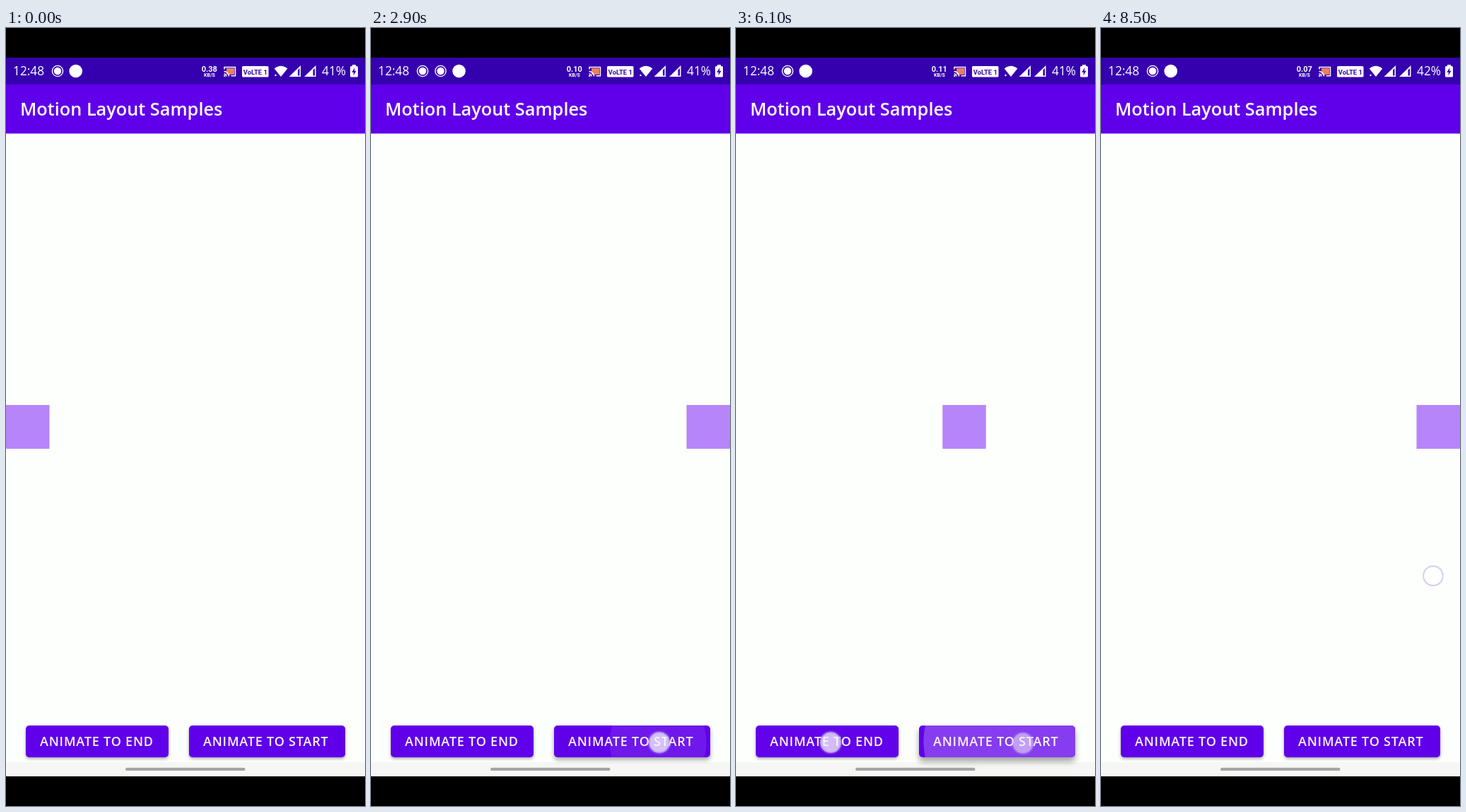
Write an HTML page with a canvas that moves like this. It is 508 px wide and 1102 px high and loops after 8.6 s.

```html
<!DOCTYPE html>
<html lang="en">
<head>
<meta charset="utf-8">
<title>Motion Layout Samples</title>
<style>
  html, body { margin: 0; width: 100%; height: 100%; overflow: hidden; background: #000; }
  canvas { display: block; }
</style>
</head>
<body>
<canvas id="stage" width="508" height="1102"></canvas>
<script>
const c = document.getElementById('stage').getContext('2d');
const LOOP = 8600, STEP = 100, TRAVEL = 1000, RIPPLE_DELAY = 20;
const SANS = '"Open Sans", "Noto Sans", sans-serif';
const BOLD = 'Roboto, sans-serif';

const buttons = {
  end: { x: 28, w: 202, label: 'ANIMATE TO END', goal: 1 },
  start: { x: 259, w: 221, label: 'ANIMATE TO START', goal: 0 }
};
const BY = 988, BH = 45;

// Each tap: finger down, finger up, button, position
const taps = [
  [1185, 1290, 'end', 196, 1011],
  [2850, 2990, 'start', 408, 1012],
  [4540, 4750, 'end', 136, 1012],
  [5210, 5350, 'start', 406, 1012],
  [5560, 5700, 'end', 135, 1012],
  [5900, 6075, 'start', 406, 1013],
  [6085, 6250, 'end', 134, 1012],
  [6380, 6522, 'start', 406, 1013],
  [6622, 6840, 'end', 134, 1016],
  [8390, 8600, null, 470, 776]
].map(([down, up, target, x, y]) => ({ down, up, target, x, y }));

const clamp = v => Math.max(0, Math.min(1, v));
const smooth = v => v * v * (3 - 2 * v);
const at = (t, steps) => steps.filter(s => t >= s[0]).pop()[1];

function rect(x, y, w, h, color) {
  c.fillStyle = color;
  c.fillRect(x, y, w, h);
}

function roundRect(x, y, w, h, r, color) {
  c.beginPath();
  c.roundRect(x, y, w, h, r);
  c.fillStyle = color;
  c.fill();
}

function circle(x, y, r, color) {
  c.beginPath();
  c.arc(x, y, r, 0, 7);
  c.fillStyle = color;
  c.fill();
}

function ring(x, y, r, width, color) {
  c.beginPath();
  c.arc(x, y, r, 0, 7);
  c.lineWidth = width;
  c.strokeStyle = color;
  c.stroke();
}

function poly(points, color) {
  c.beginPath();
  points.forEach(p => c.lineTo(...p));
  c.closePath();
  c.fillStyle = color;
  c.fill();
}

function text(s, x, y, font, color = '#fff', spacing = 0) {
  c.font = font;
  c.letterSpacing = spacing + 'px';
  c.fillStyle = color;
  c.fillText(s, x, y);
}

// Progress runs at a constant rate toward the goal of the latest tap
function boxX(t) {
  let p = 0, goal = 0, last = 0;
  const advance = to => {
    const d = (to - last) / TRAVEL;
    p = clamp(goal ? p + d : p - d);
    last = to;
  };
  for (const tap of taps) {
    if (!tap.target || tap.up > t) break;
    advance(tap.up);
    goal = buttons[tap.target].goal;
  }
  advance(t);
  return 446.5 * (1 - Math.cos(Math.PI * p)) / 2;
}

function recordDot(x) {
  ring(x, 61, 7.6, 1.4, '#fff');
  circle(x, 61, 5.2, '#fff');
}

function castIcon() {
  rect(312, 57, 11, 9, '#ed7f60');
  c.strokeStyle = '#fff';
  c.lineWidth = 1.5;
  c.beginPath();
  c.moveTo(309, 58.5);
  c.lineTo(309, 55.5);
  c.lineTo(324.5, 55.5);
  c.lineTo(324.5, 67.7);
  c.lineTo(318.5, 67.7);
  c.stroke();
  for (const r of [3.5, 7]) {
    c.beginPath();
    c.arc(308.5, 68.5, r, -Math.PI / 2, 0);
    c.stroke();
  }
  circle(309.3, 67.8, 1.2, '#fff');
}

function signal(x) {
  poly([[x, 69], [x + 16.5, 53], [x + 16.5, 69]], '#fff');
  poly([[x + 12.5, 59.5], [x + 15, 57], [x + 15, 67.5], [x + 12.5, 67.5]], '#3500ae');
}

function statusBar(t) {
  rect(0, 42, 508, 38, '#3500ae');
  text('12:48', 10, 67, '17.3px ' + SANS);
  const extra = t >= 500 && t < 4300;
  recordDot(73);
  if (extra) recordDot(98.5);
  circle(extra ? 124.5 : 98.7, 61, 9.3, '#fff');

  c.textAlign = 'center';
  const speed = at(t, [[0, '0.38'], [1500, '0.10'], [4400, '0.11'], [7400, '0.07']]);
  text(speed, 287.7, 62, 'bold 11px ' + BOLD);
  text('KB/S', 288, 69.3, 'bold 7px ' + BOLD);
  castIcon();
  roundRect(334, 54, 37.5, 15.5, 1.5, '#fff');
  text('VoLTE 1', 352.8, 65.5, 'bold 9.3px ' + BOLD, '#3500ae');
  c.textAlign = 'left';

  c.beginPath();
  c.moveTo(389, 69);
  c.lineTo(379.7, 57.5);
  c.quadraticCurveTo(389, 50, 398.3, 57.5);
  c.fillStyle = '#fff';
  c.fill();
  circle(381.5, 67, 1.2, '#fff');
  signal(400.5);
  signal(422);

  text(at(t, [[0, '41%'], [7700, '42%']]), 447, 67, '17.3px ' + SANS);
  roundRect(490, 52, 5, 3, 0.5, '#fff');
  roundRect(487, 54, 11, 15.5, 1.5, '#fff');
  poly([[493.5, 56], [489.3, 62.8], [492, 62.8], [491.3, 67.5], [495.7, 60.7], [493, 60.7]], '#3500ae');
}

function lift(tap, t) {
  const start = tap.down + RIPPLE_DELAY;
  return clamp((t - start) / 80) * (1 - clamp((t - tap.up - 30) / 100));
}

function ripple(b, tap, t) {
  const age = t - tap.down - RIPPLE_DELAY;
  if (age <= 0) return;
  const fade = 1 - clamp((t - Math.max(tap.up, tap.down + 225)) / 325);
  const k = smooth(clamp(age / 225));
  const r0 = b.w * 0.3, r1 = Math.hypot(b.w, BH) / 2;
  const x = tap.x + (b.x + b.w / 2 - tap.x) * k;
  const y = tap.y + (BY + BH / 2 - tap.y) * k;
  circle(x, y, r0 + (r1 - r0) * k, `rgba(255,255,255,${0.24 * clamp(age / 75) * fade})`);
}

function button(name, t) {
  const b = buttons[name], own = taps.filter(tap => tap.target === name);
  const up = Math.max(...own.map(tap => lift(tap, t)));
  c.save();
  c.shadowColor = 'rgba(0,0,0,0.36)';
  c.shadowBlur = 4 + 5 * up;
  c.shadowOffsetY = 2 + 4 * up;
  roundRect(b.x, BY, b.w, BH, 5, '#6000ea');
  c.restore();

  c.save();
  c.beginPath();
  c.roundRect(b.x, BY, b.w, BH, 5);
  c.clip();
  own.forEach(tap => ripple(b, tap, t));
  c.restore();
  text(b.label, b.x + 20, 1017, '600 18px ' + SANS, '#fbf5ff', 0.8);
}

function finger(tap, t) {
  if (t < tap.down || t > tap.up + 70) return;
  c.save();
  c.globalAlpha = 1 - clamp((t - tap.up) / 70);
  const halo = c.createRadialGradient(tap.x, tap.y, 13, tap.x, tap.y, 18);
  halo.addColorStop(0, 'rgba(215,205,245,0.45)');
  halo.addColorStop(1, 'rgba(215,205,245,0)');
  if (tap.target) circle(tap.x, tap.y, 18, halo);
  circle(tap.x, tap.y, 13, 'rgba(255,255,255,0.58)');
  ring(tap.x, tap.y, 13.8, 2, 'rgba(200,195,232,0.8)');
  c.restore();
}

function draw(t) {
  rect(0, 0, 508, 1102, '#000');
  rect(0, 149, 508, 891, '#fdfffc');
  statusBar(t);
  rect(0, 80, 508, 69.5, '#6000ea');
  text('Motion Layout Samples', 20, 124, '600 25.3px ' + SANS);
  rect(boxX(t), 534, 61.5, 62, '#b785fa');
  rect(0, 1040, 508, 20, '#f6f7f5');
  button('end', t);
  button('start', t);
  roundRect(169, 1047.7, 169.5, 4.3, 2, '#a4a4a4');
  taps.forEach(tap => finger(tap, t));
}

const begin = performance.now();
function frame() {
  const t = (performance.now() - begin) % LOOP;
  draw(Math.floor(t / STEP) * STEP);
  requestAnimationFrame(frame);
}
frame();
</script>
</body>
</html>
```
